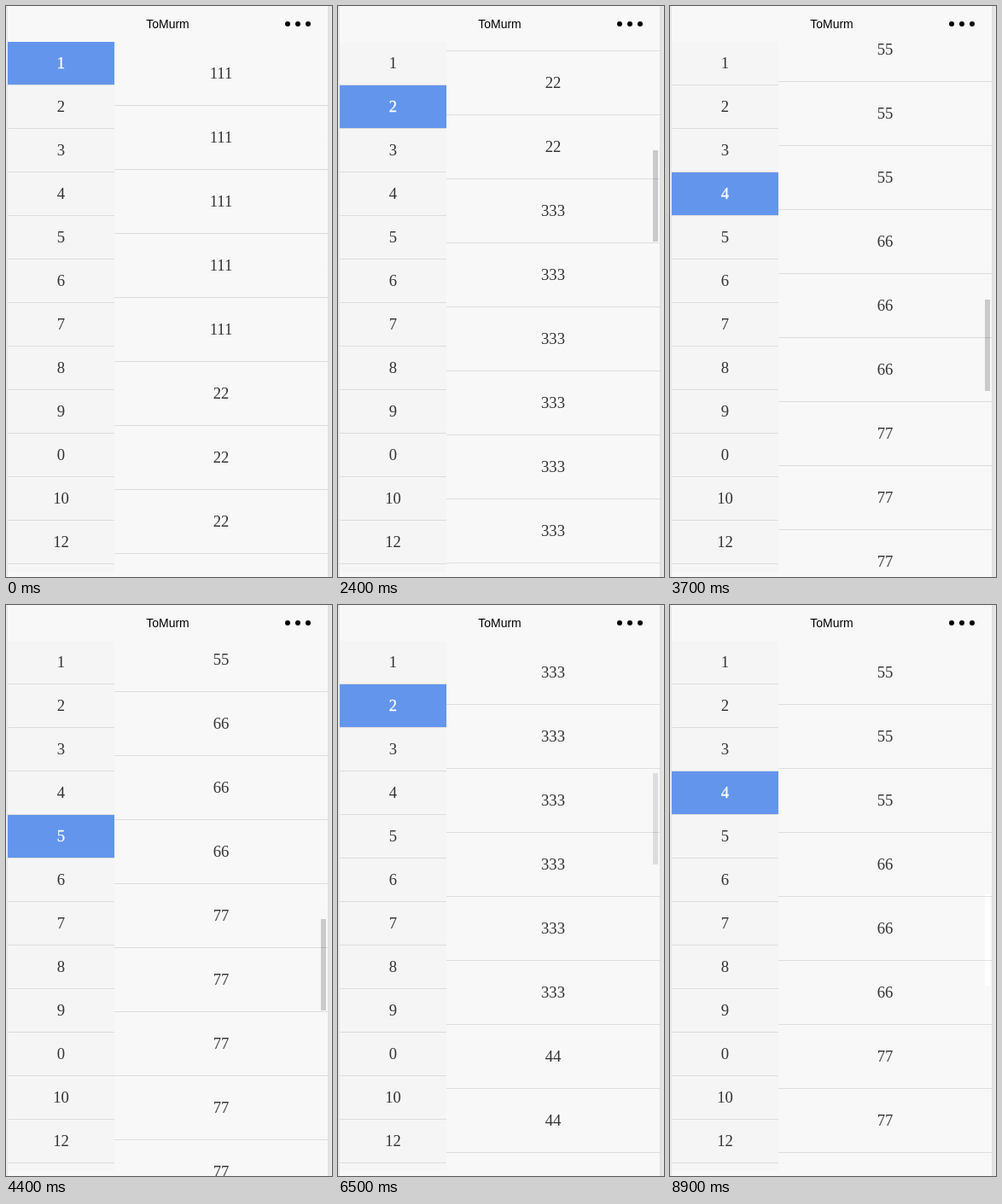
These frames come from a looping animation (382x669 px, 9000 ms). An HTML page:

```html
<!DOCTYPE html>
<html lang="en">
<head>
<meta charset="utf-8">
<title>Linked list</title>
<style>
  html, body { margin: 0; width: 100%; height: 100%; overflow: hidden; background: #e8e8e8; }
  #stage { position: relative; width: 382px; height: 669px; overflow: hidden;
    background: linear-gradient(90deg, #e8e8e8 377px, #dedede 377px, #e9e9e9 382px); }
  #phone { position: absolute; left: 2px; top: 0; width: 375px; height: 669px; overflow: hidden; background: #f8f8f8;
    font: 18.7px "Liberation Serif", serif; color: #333; text-align: center; }
  header { position: absolute; left: 0; top: 0; width: 375px; height: 42px; background: #f8f8f8;
    font: 14px/42px "Liberation Sans", Arial, sans-serif; color: #000; }
  header i { position: absolute; top: 18px; width: 6px; height: 6px; border-radius: 50%; background: #000; }
  #menu { position: absolute; left: 0; top: 42px; width: 125px; height: 621px; overflow: hidden; background: #f5f5f5; }
  #menu div { box-sizing: border-box; height: 51px; line-height: 50px; border-bottom: 1px solid #dcdcdc; }
  #menu .on { background: #6495ed; color: #fff; -webkit-text-stroke: .3px #fff; }
  #view { position: absolute; left: 125px; top: 42px; width: 250px; height: 627px; overflow: hidden; }
  #list { position: absolute; left: 0; top: 0; width: 250px; }
  #list div { box-sizing: border-box; height: 75px; line-height: 74px; border-bottom: 1px solid rgba(0, 0, 0, .11); }
  #thumb { position: absolute; right: 2px; top: 0; width: 6px; height: 107px; }
</style>
</head>
<body>
<div id="stage">
  <div id="phone">
    <div id="menu"></div>
    <div id="view"><div id="thumb"></div><div id="list"></div></div>
    <header>ToMurm<i style="left:325px"></i><i style="left:337px"></i><i style="left:349px"></i></header>
  </div>
</div>
<script>
const LOOP = 9000, STEP = 100, ROW = 75, TAPS_FROM = 5300;
const menu = document.getElementById('menu');
const list = document.getElementById('list');
const thumb = document.getElementById('thumb');

function addRow(parent, text) {
  const row = document.createElement('div');
  row.textContent = text;
  parent.append(row);
  return row;
}

const labels = '1 2 3 4 5 6 7 8 9 0 10 12'.split(' ');
const items = labels.map(text => addRow(menu, text));
const starts = [...'57653374333'].map((count, g) => {
  const start = list.children.length * ROW;
  const text = labels[g].repeat(g === 0 || g === 2 ? 3 : 2);
  for (let i = 0; i < count; i++) addRow(list, text);
  return start;
});

// start, end, final offset, ease-out power
const moves = [
  [1100, 1400, 200], [1500, 1800, 400], [1900, 2500, 749], [2600, 4100, 2118, 1],
  [4200, 4400, 1890], [4600, 5200, 1617],
  [5300, 5500, starts[3]], [5700, 6000, starts[2]], [6700, 6800, starts[3]],
  [7100, 7300, starts[5]], [7600, 7700, starts[7]], [8100, 8200, starts[4]]
];

function scrollAt(t) {
  let pos = 0;
  for (const [from, to, target, power = 2] of moves) {
    const p = Math.min(1, Math.max(0, (t - from) / (to - from)));
    pos += (target - pos) * (1 - (1 - p) ** power);
  }
  return Math.round(pos);
}

// the scrollbar fades half a second after the last move
function thumbColor(t) {
  const last = moves.filter(([from]) => from < t).pop();
  if (!last) return 'transparent';
  const fade = (t - last[1]) / STEP - 4;
  return fade > 2 ? '#fff' : `rgba(0, 0, 0, ${.19 - .08 * Math.max(0, fade)})`;
}

function draw() {
  const t = Math.floor(performance.now() % LOOP / STEP) * STEP;
  const pos = scrollAt(t);
  // the highlight trails one step behind a drag
  const seen = t < TAPS_FROM ? scrollAt(t - STEP) : pos;
  const active = Math.max(0, starts.filter(y => y < seen).length - 1);
  items.forEach((item, i) => item.classList.toggle('on', i === active));
  list.style.top = -pos + 'px';
  thumb.style.top = Math.round(pos * .1723) + 'px';
  thumb.style.background = thumbColor(t);
  requestAnimationFrame(draw);
}
draw();
</script>
</body>
</html>
```
